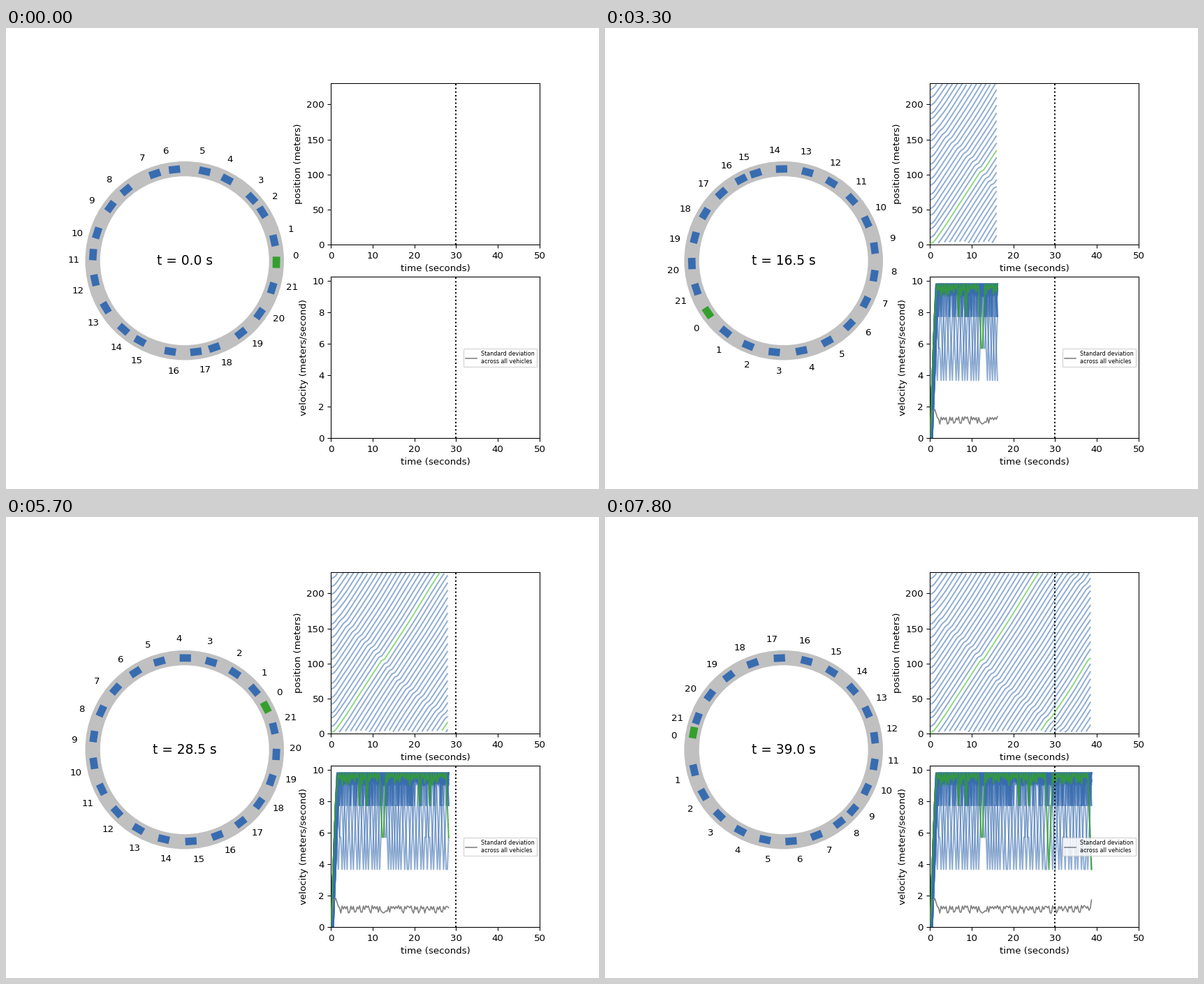
A matplotlib script that plays this animation: 849x660 px, repeating every 8 s.

```python
import numpy as np
import matplotlib.pyplot as plt
from matplotlib.animation import FuncAnimation

W, H, DPI = 849, 660, 96
CARS, ROAD = 22, 230.0
DT, STEPS_PER_SCENE, SCENES = 0.3, 5, 27
CX, CY, RADIUS, LABEL_RADIUS = 255.7, 333.2, 131.6, 158.6
SPACING, MEAN_SPEED = 360 / CARS, 13.97  # degrees, degrees per second
TOP_SPEED, SPEED_STEP = 9.8, 2.06
LAPSE = 38.6  # the green car brakes on its own here
BLUE, GREEN = "#386cb0", "#33a02c"

plt.rcParams["font.family"] = "DejaVu Sans"

rng = np.random.default_rng(4)
cars = np.arange(CARS)
times = np.arange((SCENES - 1) * STEPS_PER_SCENE + 1) * DT
start = rng.uniform(-3.3, 2.8, CARS)  # uneven starting gaps, in degrees


def jam_car(t):
    """Car the jam has reached; it travels backwards through the queue."""
    return np.interp(t, [0, 10.5, 16.5, 39], [17, 2.6, -7, -36])


def smooth(x):
    x = np.clip(x, 0, 1)
    return x * x * (3 - 2 * x)


def car_angles(t):
    """Front of every car in degrees, unwrapped."""
    behind = (cars - jam_car(t)) % CARS
    low = np.interp(t, [10, 24], [-14.3, -10.6])
    high = np.interp(t, [4.5, 16.5], [-8.8, -4.9])
    recovery = 14.3 - 0.022 * (t - 22) ** 2
    held_up = np.clip(behind / 1.2, 0, 1) - smooth((behind - recovery) / 11 + 0.5)
    lag = high + (low - high) * held_up
    # Standing start, then the uneven gaps melt into the wave.
    launch = 1 - (1 - min(t / 1.36, 1)) ** 2
    blend = smooth(t / 4.2)
    shift = -9.4 * launch + start * (1 - blend) + (lag + 9.4) * blend
    shift[0] -= 7.5 * smooth((t - LAPSE) / 1.4 + 0.6)
    return SPACING * cars + MEAN_SPEED * t + shift


def braking(distance):
    """Speed lost near a jam, in whole steps; distance in cars."""
    return SPEED_STEP * 0.99 * np.round(3 * np.clip(1 - abs(distance) / 1.25, 0, 1))


def car_speeds():
    shape = (CARS, len(times))
    behind = (cars[:, None] - jam_car(times)) % CARS
    hard = (behind > 12) & (rng.random(shape) < 0.25)
    drop = np.where(hard, SPEED_STEP, rng.uniform(.2, .8, shape))
    drop *= (np.arange(len(times)) + cars[:, None]) % 2

    distance = (behind - 0.5 + CARS / 2) % CARS - CARS / 2
    brake = braking(distance)
    brake[0] = np.maximum(brake[0], braking(1.4 * (times - LAPSE)))

    delay = DT * rng.integers(0, 3, CARS)
    delay[0] = 0
    ramp = SPEED_STEP / DT * np.maximum(times - delay[:, None], 0)
    return np.minimum(TOP_SPEED - np.maximum(drop, brake), ramp)


angles = np.array([car_angles(t) for t in times]).T
positions = angles / 360 * ROAD % ROAD
wraps = np.diff(positions, axis=1, prepend=positions[:, :1]) < -ROAD / 2
positions_cut = np.where(wraps, np.nan, positions)
speeds = car_speeds()
spread = speeds.std(axis=0)

fig = plt.figure(figsize=(W / DPI, H / DPI), dpi=DPI, facecolor="white")

stage = fig.add_axes([0, 0, 1, 1])
stage.set(xlim=(0, W), ylim=(H, 0))
stage.axis("off")
stage.add_patch(plt.Circle((CX, CY), RADIUS, fill=False, ec="#c0c0c0", lw=16))
clock = stage.text(CX, CY, "", size=14, ha="center", va="center")
bodies = [stage.plot([], [], color=BLUE if i else GREEN, lw=8,
                     solid_capstyle="butt")[0] for i in cars]
labels = [stage.text(0, 0, str(i), size=10, ha="center", va="center")
          for i in cars]


def chart(slot, ymax, yticks, ylabel):
    ax = fig.add_subplot(2, 2, slot)
    ax.set(xlim=(0, 50), ylim=(0, ymax), yticks=yticks,
           xlabel="time (seconds)", ylabel=ylabel)
    ax.axvline(30, color="black", ls=":", lw=1.5, zorder=4)
    return ax


def car_lines(ax, green, green_alpha):
    return [ax.plot([], [], lw=1.5, color=BLUE if i else green,
                    alpha=0.55 if i else green_alpha,
                    zorder=2 if i else 3)[0] for i in cars]


pos_ax = chart(2, ROAD, range(0, 201, 50), "position (meters)")
vel_ax = chart(4, 10.25, range(0, 11, 2), "velocity (meters/second)")
pos_lines = car_lines(pos_ax, "#33b81f", 0.55)
vel_lines = car_lines(vel_ax, GREEN, 0.85)
spread_line, = vel_ax.plot([], [], color="#808080", lw=1.2,
                           label="Standard deviation\nacross all vehicles")
vel_ax.legend(loc="center right", fontsize=6).set_zorder(5)


def on_ring(deg, radius):
    a = np.radians(deg)
    return CX + radius * np.cos(a), CY - radius * np.sin(a)


def update(frame):
    k = frame // 3 * STEPS_PER_SCENE
    clock.set_text(f"t = {times[k]:.1f} s")
    half = np.degrees(8.1 / RADIUS)
    n = max(k - 1, 0)
    for i in cars:
        front = angles[i, k]
        center = front - 3.45
        ends = np.array([center - half, center + half])
        bodies[i].set_data(*on_ring(ends, RADIUS))
        labels[i].set_position(on_ring(front, LABEL_RADIUS))
        pos_lines[i].set_data(times[:n], positions_cut[i, :n])
        vel_lines[i].set_data(times[:k], speeds[i, :k])
    spread_line.set_data(times[:k], spread[:k])
    return []


anim = FuncAnimation(fig, update, frames=80, interval=100,
                     repeat=True, repeat_delay=0, blit=False)
plt.show()
```
